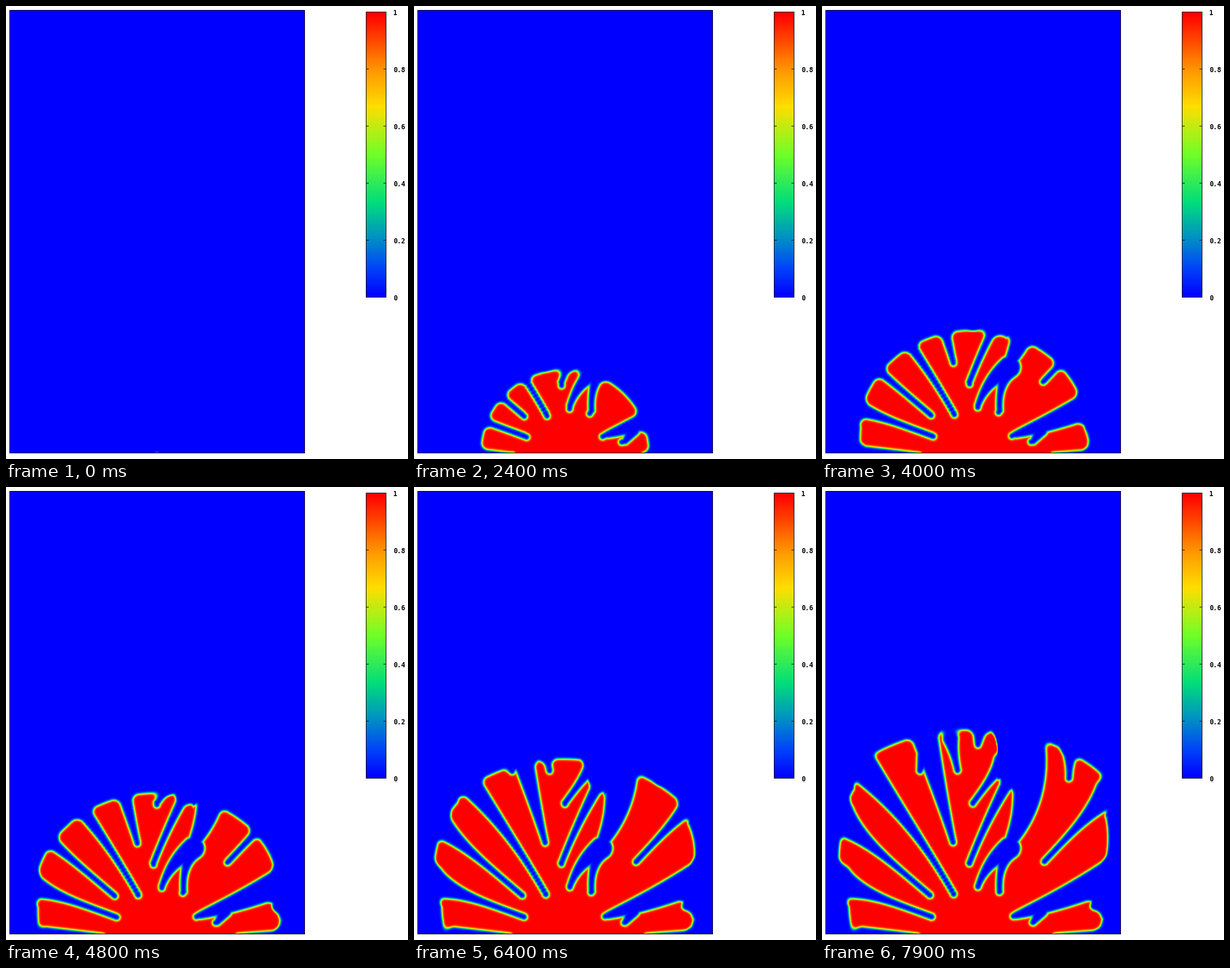
Recreate the animation shown at these times as a matplotlib script. Size 706x794 px, loop 8000 ms.

```python
import numpy as np
import matplotlib.pyplot as plt
from matplotlib.animation import FuncAnimation
from matplotlib.colors import LinearSegmentedColormap
from matplotlib.patches import Rectangle

W, H, DPI = 706, 794, 100
STEP_MS, FRAMES = 100, 80
SEED = np.array([264, 785])
GRID = 2          # pixels per field cell
EDGE = 2.3        # half width of the diffuse interface
ROUND = 12        # corner radius of growing tips
ROOT = 6          # groove radius at its inner end

X, Y = np.meshgrid(np.arange(6, 526, GRID, dtype=np.float32),
                   np.arange(415, 785, GRID, dtype=np.float32))


def capsule(p, q, r):
    """Signed distance to a thick segment."""
    dx, dy = q - p
    k = np.clip(((X - p[0]) * dx + (Y - p[1]) * dy) / (dx * dx + dy * dy + 1e-6), 0, 1)
    return np.hypot(X - p[0] - k * dx, Y - p[1] - k * dy) - r


def groove(x0, y0, x1, y1, mouth, flare=1, bend=0):
    """Gap between two fingers, widening from its root to its mouth."""
    root, d = np.array([x0, y0]), np.array([x1 - x0, y1 - y0])
    normal = np.array([-d[1], d[0]]) / np.hypot(*d)
    s = np.linspace(0, 1, 40)
    pts = root + s[:, None] * d + (4 * bend * s * (1 - s))[:, None] * normal
    radii = ROOT + (mouth - ROOT) * s ** flare
    return np.min([np.hypot(X - x, Y - y) - r for (x, y), r in zip(pts, radii)], axis=0)


# root x, y, mouth x, y, mouth radius, flare exponent, sideways bend
grooves = [
    (165, 787, 70, 788, 18),
    (191, 752, 22, 690, 33, 3.6),
    (188, 714, 24, 575, 33, 3.6),
    (230, 712, 74, 494, 27, 2.4, 7),
    (229, 621, 178, 430, 24, 1.2),
    (171, 496, 180, 466, 14),
    (237, 495, 225, 440, 14, 2),
    (273, 450, 276, 425, 12),
    (264, 553, 318, 480, 18, 3),
    (258, 658, 328, 512, 12, 2, -3),
    (273, 699, 328, 632, 20, 1.5, -8),
    (318, 640, 352, 440, 38, .8, 24),
    (311, 708, 326, 636, 18, 3, -5),
    (433, 509, 435, 462, 14, 2),
    (390, 655, 505, 533, 27, 3),
    (336, 751, 505, 680, 28, .8, 4),
    (370, 762, 384, 742, 12),
    (477, 734, 505, 712, 22),
    (410, 787, 480, 787, 11),
]
gaps = np.min([groove(*g) for g in grooves], axis=0)
roots = np.array([g[:2] for g in grooves], float)
inward = (SEED - roots) / np.hypot(*(SEED - roots).T)[:, None]

# Longest reach of a finger by its angle, measured from the left
angles = [0, 13, 35, 51, 64, 95, 99, 106, 111, 125, 138, 162, 173, 180]
limits = [210, 224, 290, 358, 600, 480, 287, 271, 600, 600, 328, 218, 230, 218]
radius = np.hypot(X - SEED[0], Y - SEED[1])
reach = np.interp(np.degrees(np.arctan2(SEED[1] - Y, SEED[0] - X)), angles, limits)


def field(t):
    """Phase value on the grid, t in seconds."""
    # power-law growth that levels off at each finger's reach
    grow = 1.5 + 75.7 * t ** 0.757
    front = radius - grow * (1 + (grow / reach) ** 8) ** (-1 / 8)

    # grooves begin deeper and their roots drift outwards
    open_ = gaps
    for p, q in zip(roots, roots + inward * 14 * np.exp(-t / 3)):
        open_ = np.minimum(open_, capsule(p, q, ROOT - 0.5))
    body = -open_

    # intersection with rounded corners
    d = (np.minimum(np.maximum(body, front), -ROUND)
         + np.hypot(np.maximum(body + ROUND, 0), np.maximum(front + ROUND, 0)))
    return 0.5 * (1 - np.tanh(d / EDGE))


stops = [(0, (0, 0, 255)), (.1, (0, 68, 250)), (.2, (0, 140, 200)), (.33, (0, 220, 125)),
         (.5, (110, 255, 40)), (.67, (255, 222, 0)), (.8, (255, 150, 0)), (1, (255, 0, 0))]
cmap = LinearSegmentedColormap.from_list(
    "heat", [(p, tuple(c / 255 for c in rgb)) for p, rgb in stops], N=128)

fig = plt.figure(figsize=(W / DPI, H / DPI), dpi=DPI, facecolor="white")
ax = fig.add_axes([0, 0, 1, 1])
ax.axis("off")
PX = 72 / DPI


def box(x0, y0, x1, y1, z, **kw):
    return ax.add_patch(Rectangle((x0, y0), x1 - x0, y1 - y0, lw=PX, zorder=z,
                                  snap=False, **kw))


plot = box(6, 7, 524, 783, 0, fc="#0000ff", ec="none")
half = GRID / 2
img = ax.imshow(field(0), cmap=cmap, vmin=0, vmax=1, interpolation="bilinear", zorder=1,
                aspect="auto", extent=(X.min() - half, X.max() + half,
                                       Y.max() + half, Y.min() - half))
img.set_clip_path(plot)
box(6, 7, 524, 783, 3, fc="none", ec="black")

ax.imshow(np.linspace(1, 0, 128)[:, None], cmap=cmap, vmin=0, vmax=1, aspect="auto",
          interpolation="nearest", extent=(632, 667, 510, 10), zorder=1)
box(632, 10, 667, 510, 3, fc="none", ec="black")
for n in range(6):
    y = 510 - 100 * n
    for x0, x1 in ((632, 636), (663, 667)):
        ax.plot([x0, x1], [y, y], color="black", lw=PX, zorder=3, snap=False)
    ax.text(679.5, y + 0.5, f"{n / 5:g}", family="DejaVu Sans Mono", weight="bold",
            size=11.6 * PX, va="center_baseline", ha="left")

# whole coordinates fall on pixel centres
ax.set_xlim(-0.5, W - 0.5)
ax.set_ylim(H - 0.5, -0.5)


def update(i):
    img.set_data(field(i * STEP_MS / 1000))
    return [img]


anim = FuncAnimation(fig, update, frames=FRAMES, interval=STEP_MS,
                     repeat=True, repeat_delay=0, blit=False)
plt.show()
```
